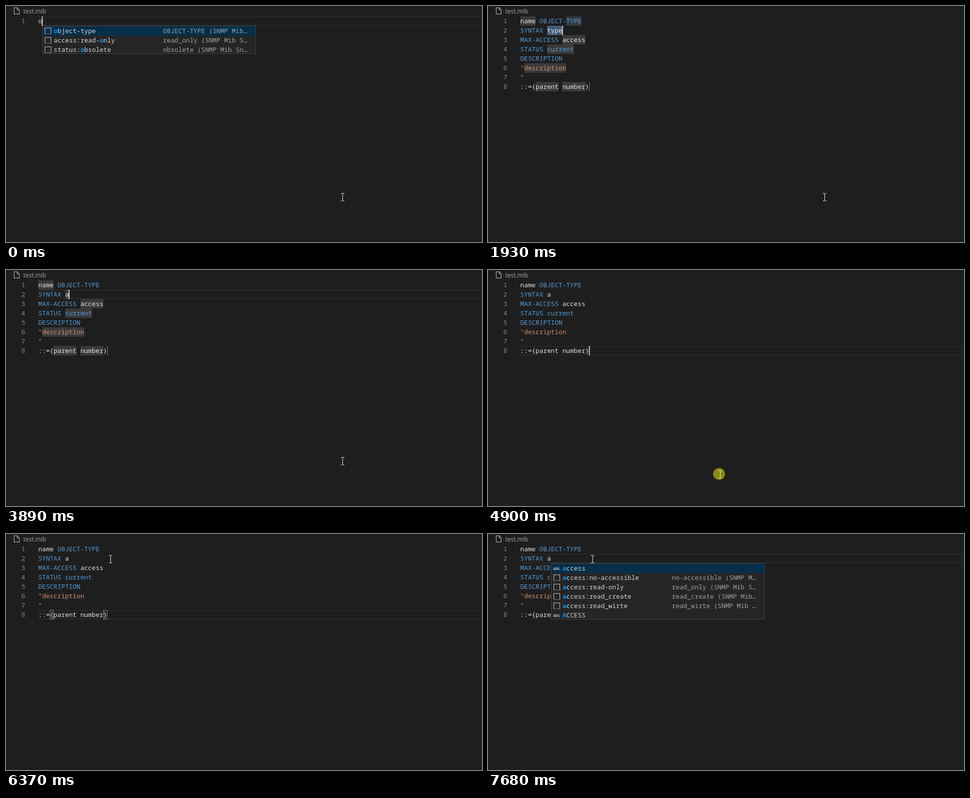
Animation, 958 px wide and 478 px high, one loop 8000 ms. Source, as an HTML page with a canvas:

```html
<!DOCTYPE html>
<html lang="en">
<head>
<meta charset="utf-8">
<title>Snippet completion</title>
<style>
  html, body { margin: 0; width: 100%; height: 100%; overflow: hidden; background: #1e1e1e; }
  canvas { display: block; }
</style>
</head>
<body>
<canvas id="stage" width="958" height="478"></canvas>
<script>
const ctx = document.getElementById('stage').getContext('2d');
const LOOP = 8000, LEFT = 65, TOP = 21, ROW = 19, CHAR = 7.7, STEP = 78;
const MONO = '12.833px "Noto Sans Mono", monospace';
const PLAIN = '#d4d4d4', TEXT = '#e2e2e2', KEY = '#569cd6', STR = '#ce9178';

const colX = col => LEFT + col * CHAR;
const rowY = row => TOP + (row - 1) * ROW;
const within = (t, from, to) => t >= from && t < to;

function rect(x, y, w, h, color) {
  ctx.fillStyle = color;
  ctx.fillRect(x, y, w, h);
}

function text(s, x, y, color, font = MONO) {
  ctx.font = font;
  ctx.fillStyle = color;
  ctx.fillText(s, x, y);
}

function mark(row, from, to, color, radius = 0) {
  const x = Math.round(colX(from));
  ctx.fillStyle = color;
  ctx.beginPath();
  ctx.roundRect(x, rowY(row), Math.round(colX(to)) - x, ROW, radius);
  ctx.fill();
}

function header() {
  ctx.strokeStyle = '#c5c5c5';
  ctx.lineWidth = 1;
  ctx.stroke(new Path2D('M16.5 3.5H22.5L26.5 7.5V16.5H16.5ZM22.5 3.5V7.5H26.5'));
  text('test.mib', 35, 15, '#a9a9a9', '12px "Open Sans", sans-serif');
}

function codeLines(t) {
  if (t < 690) return [[['o', PLAIN]]];
  const typed = within(t, 6970, 7130) ? '' : t < 2870 ? 'type' : 'a';
  return [
    [['name ', TEXT], ['OBJECT-TYPE', KEY]],
    [['SYNTAX ', KEY], [typed, TEXT]],
    [['MAX-ACCESS ', KEY], ['access', TEXT]],
    [['STATUS current', KEY]],
    [['DESCRIPTION', KEY]],
    [['"description', STR]],
    [['"', STR]],
    [['::={parent number}', TEXT]],
  ];
}

function drawCode(t) {
  codeLines(t).forEach((tokens, i) => {
    const y = rowY(i + 1) + 14;
    text(String(i + 1), 31, y, '#858585');
    let col = 0;
    for (const [s, color] of tokens) {
      text(s, colX(col), y, t < 760 ? PLAIN : color);
      col += s.length;
    }
  });
}

function activeLine(t) {
  const row = t < 690 ? 1 : within(t, 2870, 4900) || t >= 6510 ? 2 : t >= 4900 ? 8 : 0;
  if (!row) return;
  for (const dy of [0, ROW - 2]) rect(LEFT, rowY(row) + dy, 958 - LEFT, 2, '#282828');
}

function highlights(t) {
  if (within(t, 690, 4900)) {
    if (t < 1930) mark(1, 0, 4, '#264f78', 3);
    else if (t < 2870) {
      mark(2, 7, 11, '#264f78', 3);
      mark(1, 12, 16, 'rgba(173,214,255,.15)');
    }
    const slots = [[1, 0, 4], [2, 7, t < 2870 ? 11 : 8], [3, 11, 17], [4, 7, 14],
                   [6, 1, 12], [8, 4, 10], [8, 11, 17]];
    for (const [row, from, to] of slots) mark(row, from, to, 'rgba(124,124,124,.3)');
    rect(203, rowY(8), 2, ROW, '#525252');
  }
  if (within(t, 4980, 6600)) {
    ctx.strokeStyle = '#888';
    ctx.lineWidth = 1;
    for (const col of [3, 17]) {
      mark(8, col, col + 1, 'rgba(0,100,0,.1)');
      ctx.strokeRect(Math.round(colX(col)) + .5, rowY(8) + .5, 7, ROW - 1);
    }
  }
  if (within(t, 6740, 6970)) mark(2, 7, 8, 'rgba(87,87,87,.72)');
}

// [from, to, row, column] while the caret is visible
const CARET = [
  [0, 460, 1, 1], [690, 1160, 1, 4], [1710, 1930, 1, 4], [1930, 2480, 2, 11],
  [2870, 3330, 2, 8], [3890, 4350, 2, 8], [4900, 5360, 8, 18], [5910, 6370, 8, 18],
  [6510, 6970, 2, 8], [6970, 7130, 2, 7], [7130, 7680, 2, 8],
];

function caret(t) {
  const c = CARET.find(([from, to]) => within(t, from, to));
  if (c) rect(Math.floor(colX(c[3])), rowY(c[2]), 2, ROW, '#c4c4c0');
}

const FIRST = [
  ['object-type', 0, 'OBJECT-TYPE (SNMP Mib…'],
  ['access:read-only', 12, 'read_only (SNMP Mib S…'],
  ['status:obsolete', 7, 'obsolete (SNMP Mib Sn…'],
];
const SECOND = [
  ['access', 0],
  ['access:no-accessible', 0, 'no-accessible (SNMP M…'],
  ['access:read-only', 0, 'read_only (SNMP Mib S…'],
  ['access:read_create', 0, 'read_create (SNMP Mib…'],
  ['access:read_wirte', 0, 'read_wirte (SNMP Mib …'],
  ['ACCESS', 0],
];

function snippetIcon(x, y) {
  rect(x, y, 13, 1, '#c5c5c5');
  rect(x, y, 1, 12, '#c5c5c5');
  rect(x + 12, y, 1, 12, '#c5c5c5');
  for (let i = 0; i < 13; i += 2) rect(x + i, y + 12, 1, 1, '#c5c5c5');
}

function popup(items, x, y) {
  const w = 430, h = items.length * ROW;
  rect(x, y, w, h, '#454545');
  rect(x + 1, y + 1, w - 2, h - 2, '#252526');
  ctx.save();
  ctx.beginPath();
  ctx.rect(x + 1, y + 1, w - 2, h - 2);
  ctx.clip();
  rect(x + 1, y + 1, w - 2, ROW, '#062f4a');
  items.forEach(([label, hit, detail], i) => {
    const top = y + 1 + i * ROW, base = top + 14, lx = x + 23;
    if (detail) {
      snippetIcon(x + 5, top + 3);
      text(detail, x + 243, base, 'rgba(212,212,212,.7)');
    } else {
      text('abc', x + 4, top + 13, '#c5c5c5', '600 8px Inter, sans-serif');
    }
    text(label.slice(0, hit), lx, base, PLAIN);
    text(label[hit], lx + hit * CHAR, base, '#0097fb', 'bold ' + MONO);
    text(label.slice(hit + 1), lx + (hit + 1) * CHAR, base, PLAIN);
  });
  ctx.restore();
}

function pointerAt(t) {
  if (t < 4428) return [677, 387];
  if (t < 5670) {
    const path = [[638, 402], [545, 422], [482, 418], [467, 414]];
    return path[Math.min(3, Math.floor((t - 4428) / STEP))];
  }
  const p = Math.min(1, (Math.floor((t - 5670) / STEP) + 1) / 9);
  const e = p * p * (3 - 2 * p);
  return [Math.round(467 - 257 * e), Math.round(414 - 363 * e)];
}

function pointer(t) {
  const [x, y] = pointerAt(t);
  if (within(t, 4900, 5050) || within(t, 6510, 6740)) {
    ctx.fillStyle = 'rgba(255,255,0,.48)';
    ctx.beginPath();
    ctx.arc(x - 2, y - 1, 12, 0, Math.PI * 2);
    ctx.fill();
  }
  rect(x, y - 7, 1, 14, '#f0f0f0');
  for (const dy of [-8, 7]) {
    rect(x - 3, y + dy, 3, 1, '#f0f0f0');
    rect(x + 1, y + dy, 3, 1, '#f0f0f0');
  }
}

function draw() {
  const t = performance.now() % LOOP;
  rect(0, 0, 958, 478, '#1e1e1e');
  header();
  activeLine(t);
  highlights(t);
  drawCode(t);
  caret(t);
  if (t < 690) popup(FIRST, 73, 40);
  if (t >= 7210) popup(SECOND, 127, 59);
  pointer(t);
  requestAnimationFrame(draw);
}
draw();
</script>
</body>
</html>
```
